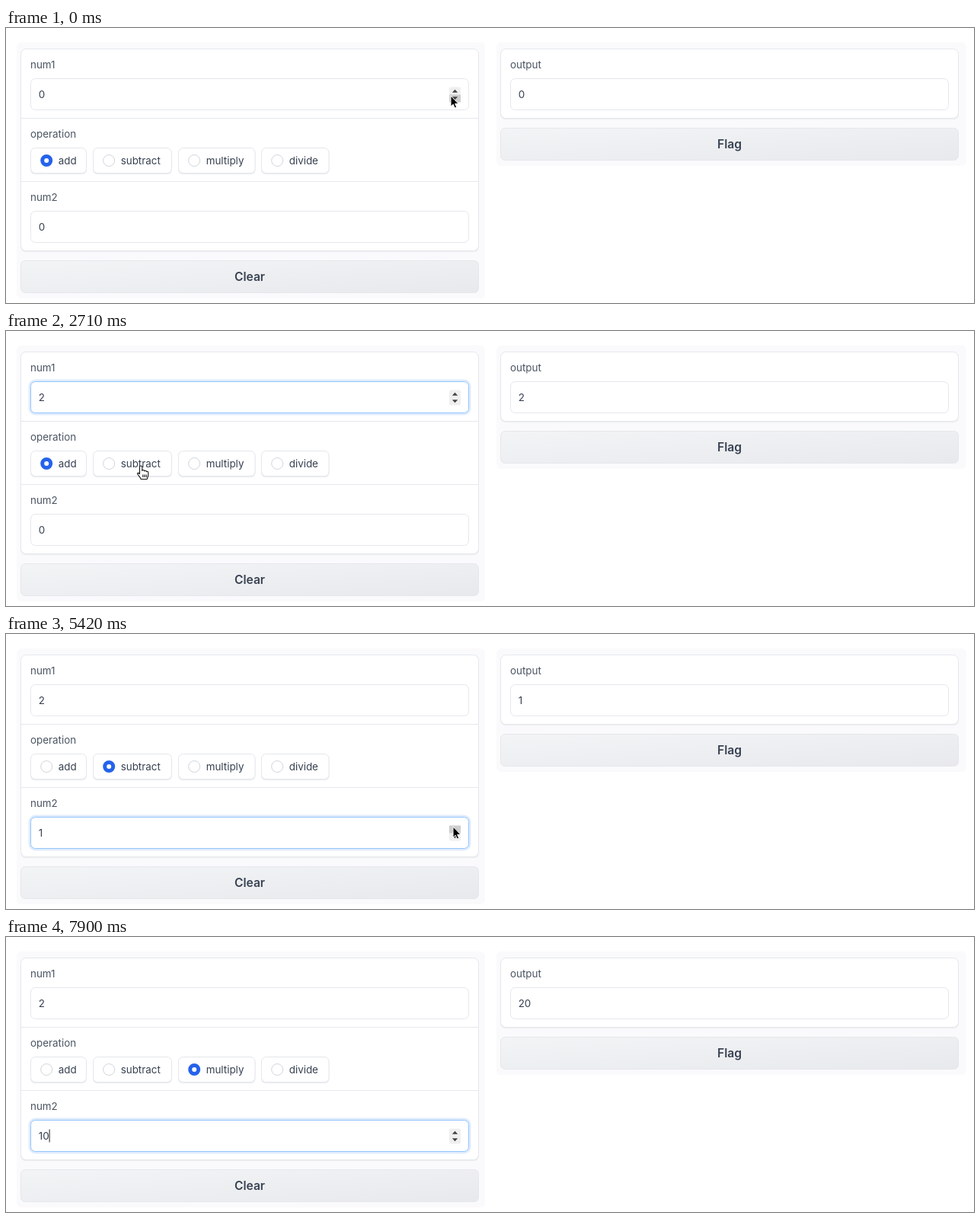
Animation, 1271 px wide and 361 px high, one loop 8 s. Source, as an HTML page:

```html
<!DOCTYPE html>
<html lang="en">
<head>
<meta charset="utf-8">
<title>Calculator demo</title>
<style>
html, body { margin: 0; width: 100%; height: 100%; overflow: hidden; background: #fff; }
svg { display: block; font: 400 13.4px Inter, sans-serif; fill: #374151; }
.page { fill: #fafafc; }
.box { fill: #fff; stroke: #e5e7eb; }
.shadow { fill: #eceef1; }
.label { fill: #4b5563; }
.button { fill: url(#grey); stroke: #e5e7eb; }
.caption { font-size: 15.6px; font-weight: 600; text-anchor: middle; }
.focus { fill: none; stroke: #dfecfd; stroke-width: 4; }
.focus + .box.on { stroke: #93c5fd; }
</style>
</head>
<body>
<svg id="stage" width="1271" height="361" viewBox="0 0 1271 361"></svg>
<script>
const LOOP = 8000;
const stage = document.getElementById('stage');
const $ = id => document.getElementById(id);

const rect = (cls, x, y, w, h, r, extra = '') =>
  `<rect class="${cls}" x="${x}" y="${y}" width="${w}" height="${h}" rx="${r}" ${extra}/>`;
const text = (cls, x, y, s, id = '') => `<text class="${cls}" id="${id}" x="${x}" y="${y}">${s}</text>`;
const card = (x, y, w, h, r) => rect('shadow', x - .5, y + 1, w + 1, h + .8, r) + rect('box', x, y, w, h, r);
const button = (x, y, s) =>
  rect('button', x, y, 601, 42, 6) + text('caption', x + 300.5, y + 26.5, s);

const input = (id, x, y) => `
  ${rect('focus', x - 1, y - 1, 577, 43, 7, `id="${id}Ring"`)}
  ${rect('box', x, y, 575, 41, 6, `id="${id}Box"`)}
  ${text('', x + 10.2, y + 25.5, '0', id)}
  <rect id="${id}Caret" y="${y + 12}" width="1" height="17" fill="#222"/>
  <g id="${id}Spin" transform="translate(${x + 549.5} ${y + 11})">
    <rect width="15" height="20" rx="2" fill="#efefef"/>
    <rect id="${id}Half" width="15" height="10" fill="#cdcdcd"/>
    <path d="M3.8 7.2L7.5 3.2L11.2 7.2ZM3.8 12.8L7.5 16.8L11.2 12.8Z" fill="#444"/>
  </g>`;

const radios = [['add', 32.5, 73], ['subtract', 114.5, 103], ['multiply', 226.5, 100.5], ['divide', 335.5, 88.5]];
const radio = ([name, x, w]) => `
  ${card(x, 157.5, w, 33, 6)}
  <circle id="${name}Ring" cx="${x + 20.7}" cy="174" r="10" fill="#dbeafe"/>
  <circle id="${name}Dot" cx="${x + 20.7}" cy="174"/>
  ${text('', x + 36.2, 178.6, name)}`;

stage.innerHTML = `
  <linearGradient id="grey" x2="1" y2="1">
    <stop stop-color="#f3f4f6"/><stop offset="1" stop-color="#e8e9ec"/>
  </linearGradient>
  ${rect('page', 14, 19, 615, 336, 6)}${rect('page', 644, 19, 617, 162, 6)}
  ${card(19.5, 27.5, 601, 265, 7)}${card(649.5, 27.5, 601, 91, 7)}
  <path d="M20 118.5H620M20 201.5H620" stroke="#e5e7eb"/>
  ${text('label', 32, 52.7, 'num1')}${text('label', 32, 143.7, 'operation')}
  ${text('label', 32, 226.7, 'num2')}${text('label', 662, 52.7, 'output')}
  ${input('num1', 32.5, 66.5)}${input('num2', 32.5, 240.5)}
  ${rect('box', 662.5, 66.5, 575, 41, 6)}${text('', 672.7, 92, '0', 'output')}
  ${radios.map(radio).join('')}
  ${button(19.5, 305.5, 'Clear')}${button(649.5, 131.5, 'Flag')}
  <path id="cursor" stroke-linejoin="round"/>`;

const cursors = {
  arrow: ['M0 0V14L3.2 11.2L5.3 16L7.7 15L5.6 10.4H10Z', '#000', '#fff', 1],
  beam: ['M-3-8Q0-8 0-6Q0-8 3-8M0-6V6M-3 8Q0 8 0 6Q0 8 3 8M-2 2H2', 'none', '#222', 1.4],
  hand: ['M-2.5 10.5V1.5C-2.5-.5.8-.5.8 1.5V6.5C.8 5 3.6 5 3.6 7C3.8 5.7 6.3 6 6.3 7.8' +
    'C6.5 6.8 8.8 7 8.8 9V12.5C8.8 14 7.5 15 7.2 17.5H-.8C-1.5 15.5-3 14-4.5 12' +
    'C-6.5 9.5-4.5 8.5-2.5 10.5ZM1.8 11.5V15M4 11.5V15M6.2 11.5V15', '#fff', '#111', 1.1]
};

// Pointer path: time, x, y
const path = [
  [0, 584, 89], [480, 588, 80], [1680, 588, 80], [1840, 580, 87], [1920, 568, 94],
  [2080, 455, 122], [2240, 270, 162], [2390, 178, 177], [3750, 178, 177], [3910, 215, 188],
  [4390, 530, 246], [4620, 587, 253], [5660, 587, 253], [5820, 545, 242], [6140, 300, 187],
  [6300, 242, 177], [6620, 242, 177], [6700, 220, 198], [6860, 145, 238], [7100, 80, 262], [8000, 80, 262]
];

const within = (t, ...spans) => spans.some(([a, b]) => t >= a && t < b);
const latest = (t, steps) => steps.filter(s => t >= s[0]).pop()[1];
const show = (id, on) => $(id).style.display = on ? '' : 'none';

function pointer(t) {
  const i = Math.max(1, path.findIndex(p => p[0] > t));
  const [a, b] = [path[i - 1], path[i]];
  const k = (t - a[0]) / (b[0] - a[0]);
  return [a[1] + (b[1] - a[1]) * k, a[2] + (b[2] - a[2]) * k];
}

function snap(t) {
  const drift = 10 * ((t > 2300) + (t > 4200));
  return Math.floor((t + drift) / 80) * 80 - drift;
}

function drawInput(id, top, value, focused, caret, [x, y], pointing) {
  const over = pointing && x > 32 && x < 608 && y > top && y < top + 41;
  const onSpin = over && x > 582 && x < 597 && y > top + 11 && y < top + 31;
  $(id).textContent = value;
  show(id + 'Ring', focused);
  $(id + 'Box').classList.toggle('on', focused);
  show(id + 'Caret', caret);
  $(id + 'Caret').setAttribute('x', 42.7 + $(id).getComputedTextLength());
  show(id + 'Spin', focused || over);
  show(id + 'Half', onSpin);
  $(id + 'Half').setAttribute('y', y > top + 21 ? 10 : 0);
  return over && !onSpin;
}

function draw(t) {
  const at = pointer(Math.max(0, snap(t)));
  const [x, y] = at;
  const pointing = t < 7900;
  const overText1 = drawInput('num1', 66.5, latest(t, [[0, 0], [640, 1], [1280, 2]]),
    within(t, [640, 3510]), within(t, [640, 1120], [1280, 1760], [2230, 2710], [3190, 3510]), at, pointing);
  const overText2 = drawInput('num2', 240.5, latest(t, [[0, 0], [4940, 1], [7900, 10]]),
    within(t, [4940, 6300], [7100, LOOP]),
    within(t, [4940, 5420], [5900, 6300], [7180, 7660], [7900, LOOP]), at, pointing);
  $('output').textContent = latest(t, [[0, 0], [720, 1], [1360, 2], [5020, 1], [6460, 2], [7900, 20]]);

  const chosen = latest(t, [[0, 'add'], [3590, 'subtract'], [6380, 'multiply']]);
  const ringed = within(t, [3590, 4940], [6380, 7100]);
  let overRadio = false;
  for (const [name, left, width] of radios) {
    const on = name === chosen, dot = $(name + 'Dot');
    show(name + 'Ring', on && ringed);
    dot.setAttribute('r', on ? 5.5 : 7.5);
    dot.setAttribute('fill', '#fff');
    dot.setAttribute('stroke', on ? '#2563eb' : '#d1d5db');
    dot.setAttribute('stroke-width', on ? 5 : 1);
    overRadio ||= x > left && x < left + width && y > 157 && y < 191;
  }

  const [d, fill, stroke, weight] = cursors[overText1 || overText2 ? 'beam' : overRadio ? 'hand' : 'arrow'];
  const attrs = { d, fill, stroke, 'stroke-width': weight, transform: `translate(${x} ${y})` };
  for (const key in attrs) $('cursor').setAttribute(key, attrs[key]);
  show('cursor', pointing);
}

const start = performance.now();
function tick() {
  draw((performance.now() - start) % LOOP);
  requestAnimationFrame(tick);
}
tick();
</script>
</body>
</html>
```
